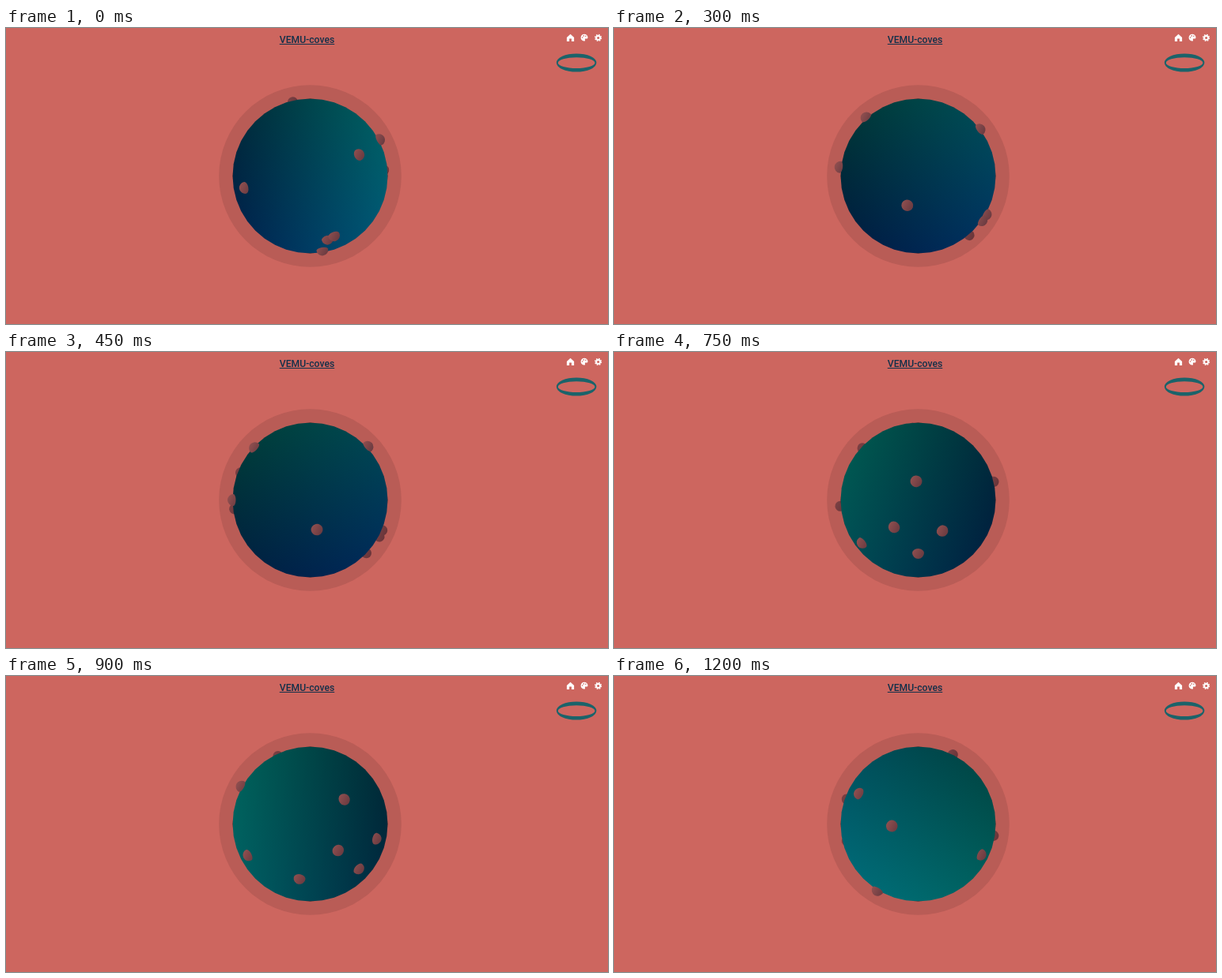
Animation, 761 px wide and 375 px high, one loop 1.35 s. Source, as an HTML page with a canvas:

```html
<!DOCTYPE html>
<html lang="en">
<head>
<meta charset="utf-8">
<title>VEMU-coves</title>
<style>
  html, body { margin: 0; width: 100%; height: 100%; overflow: hidden; background: #cd665f; }
  #stage { position: relative; width: 761px; height: 375px; overflow: hidden; }
  canvas, svg { position: absolute; left: 0; top: 0; }
  h1 {
    position: absolute; left: 0; top: 8px; width: 761px; margin: 0;
    font: 500 12.2px/14px Roboto, "Liberation Sans", sans-serif;
    text-align: center; text-decoration: underline;
    text-underline-offset: 1px; color: #12304a;
  }
</style>
</head>
<body>
<div id="stage">
  <canvas id="view" width="761" height="375"></canvas>
  <svg width="761" height="375">
    <path d="M695.8 44a25.3 11.6 0 0 1 50.6 0a25.3 11.6 0 0 1-50.6 0zM697.8 44.2a23.3 6.9 0 0 0 46.6 0a23.3 6.9 0 0 0-46.6 0z"
          fill="#1b636a" fill-rule="evenodd"/>
    <g fill="#fff">
      <path d="M713.5 7.8l4.6 4.2v5h-3.2v-3.4h-2.8v3.4h-3.2v-5z"/>
      <path d="M731 7.8a4.4 4.4 0 1 0 0 8.8c1.3 0 1.2-1 .9-1.6c-.4-.9.2-1.6 1-1.6h1.2c1 0 1.4-.7 1.4-1.5c0-2.4-2-4.1-4.5-4.1z"/>
      <circle cx="748.6" cy="12.4" r="3.4"/>
      <circle cx="748.6" cy="12.4" r="3.9" fill="none" stroke="#fff" stroke-width="1.4" stroke-dasharray="1.7 1.36"/>
    </g>
    <g fill="#cd665f">
      <circle cx="728.7" cy="12" r=".8"/>
      <circle cx="730.2" cy="9.9" r=".8"/>
      <circle cx="732.8" cy="10.2" r=".8"/>
      <circle cx="748.6" cy="12.4" r="1.5"/>
    </g>
  </svg>
  <h1>VEMU-coves</h1>
</div>
<script>
const ctx = document.getElementById('view').getContext('2d');
const CX = 384.5, CY = 187.5, R = 98, ORBIT = 99;
const STEP = 150, STEPS = 9;
const rad = degrees => degrees * Math.PI / 180;
const TILT = rad(30.4), SIN = Math.sin(TILT), COS = Math.cos(TILT);

// Spin in degrees at a few steps; the steps between are interpolated.
const spinKeys = [[0, 0], [1, 36], [3, 62], [5, 160], [7, 238], [8, 304]];

// Rocks as [longitude, height]; ground rocks turn with the surface colours.
const looseRocks = [[-57, 14], [12, -66], [-162, 69], [-178, 15], [-142, 10], [-160, -21], [153, -24], [109, -10]];
const groundRocks = [[14, -41], [19, -36], [51, 60], [99, 45]];

function spinAt(step) {
  const i = Math.max(1, spinKeys.findIndex(([s]) => s >= step));
  const [s0, a0] = spinKeys[i - 1], [s1, a1] = spinKeys[i];
  return a0 + (a1 - a0) * (step - s0) / (s1 - s0);
}

// Places a rock on the tilted globe.
function place([longitude, up], spin) {
  const a = rad(longitude + spin), ring = Math.sqrt(ORBIT * ORBIT - up * up);
  const z = ring * Math.cos(a);
  return { x: ring * Math.sin(a), y: z * SIN - up * COS, depth: z * COS + up * SIN };
}

function drawRock({ x, y, depth }) {
  const behind = depth < 0, r = behind ? 6.6 : 7.5, angle = Math.atan2(y, x);
  ctx.save();
  ctx.translate(CX + x, CY + y);
  const shade = ctx.createLinearGradient(-r, -r / 2, r, r / 2);
  shade.addColorStop(0, behind ? '#7c4144' : '#925050');
  shade.addColorStop(1, behind ? '#683439' : '#683a40');
  ctx.fillStyle = shade;
  // Half-sunk ball: round on the outside, foreshortened towards the middle.
  const inner = behind ? r : r * Math.max(0.4, depth / ORBIT);
  ctx.beginPath();
  ctx.ellipse(0, 0, r, r, angle, -Math.PI / 2, Math.PI / 2);
  ctx.ellipse(0, 0, inner, r, angle, Math.PI / 2, Math.PI * 1.5);
  ctx.fill();
  ctx.restore();
}

function disc(r, sides) {
  ctx.beginPath();
  for (let i = 0; i < sides; i++) {
    const a = i / sides * Math.PI * 2;
    ctx.lineTo(CX + r * Math.cos(a), CY + r * Math.sin(a));
  }
  ctx.closePath();
}

// Adds one colour channel that rises by (sx, sy) from the centre to the rim.
function fillSlope(mid, sx, sy, color) {
  const len = Math.hypot(sx, sy), dx = sx / len * R, dy = sy / len * R;
  const ramp = ctx.createLinearGradient(CX - dx, CY - dy, CX + dx, CY + dy);
  ramp.addColorStop(0, color(mid - len));
  ramp.addColorStop(1, color(mid + len));
  ctx.fillStyle = ramp;
  ctx.fillRect(CX - R, CY - R, 2 * R, 2 * R);
}

function drawPlanet(spin) {
  const green = rad(107 + spin), blue = green - rad(30);
  ctx.save();
  disc(R, 40);
  ctx.fillStyle = '#000';
  ctx.fill();
  ctx.clip();
  ctx.globalCompositeOperation = 'lighter';
  fillSlope(70 + 19 * Math.cos(green), 29 * Math.sin(green), 17 * Math.cos(green), v => `rgb(0 ${v} 0)`);
  fillSlope(84 + 14 * Math.cos(blue), 22 * Math.sin(blue), 10 + 8 * Math.cos(blue), v => `rgb(0 0 ${v})`);
  ctx.restore();
}

function draw(step) {
  const spin = spinAt(step);
  const groundSpin = spin - 13 * Math.max(0, step - 3); // the ground lags behind
  const rocks = [
    ...looseRocks.map(rock => place(rock, spin)),
    ...groundRocks.map(rock => place(rock, groundSpin))
  ].sort((a, b) => a.depth - b.depth);

  ctx.fillStyle = '#cd665f';
  ctx.fillRect(0, 0, 761, 375);
  disc(115.3, 64);
  ctx.fillStyle = '#b95c56';
  ctx.fill();
  rocks.filter(rock => rock.depth < 0).forEach(drawRock);
  drawPlanet(groundSpin);
  rocks.filter(rock => rock.depth >= 0).forEach(drawRock);
}

function tick() {
  draw(Math.floor(performance.now() / STEP) % STEPS);
  requestAnimationFrame(tick);
}
tick();
</script>
</body>
</html>
```
